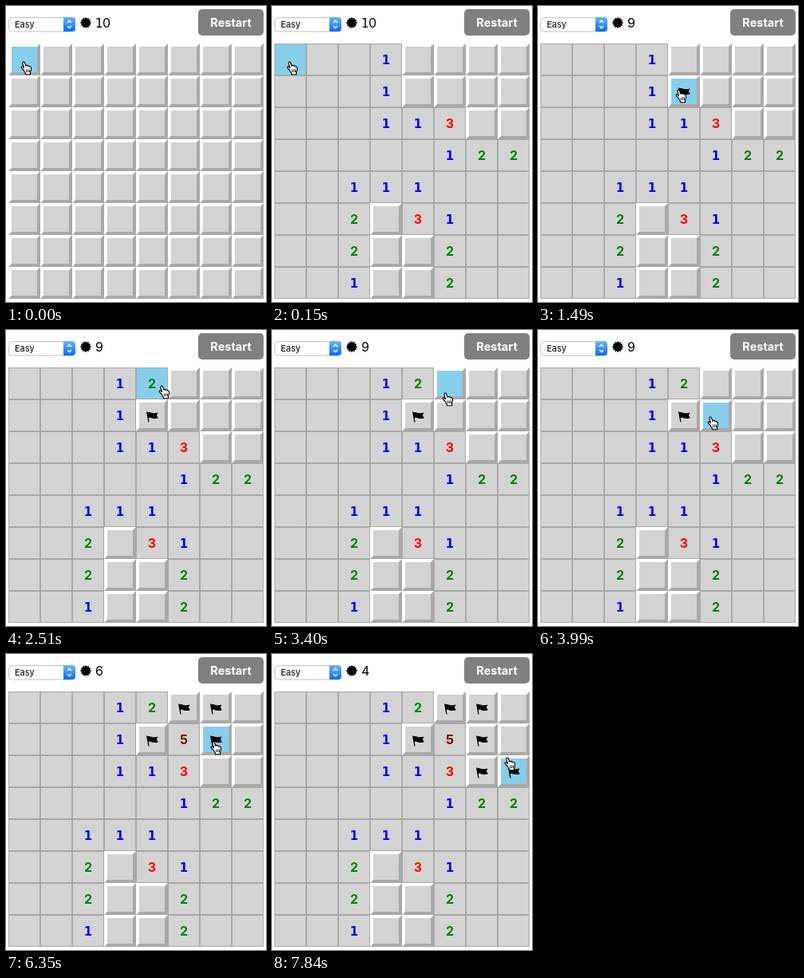
An HTML page that plays this animation: 326 px wide and 371 px high, repeating every 7990 ms.

```html
<!DOCTYPE html>
<html lang="en">
<head>
<meta charset="utf-8">
<title>Minesweeper</title>
<style>
  html, body { margin: 0; width: 100%; height: 100%; overflow: hidden; background: #fff; }
  svg { display: block; }
  text { font-family: Inter, "Open Sans", sans-serif; }
  .digit { font-size: 16px; font-weight: 700; text-anchor: middle; }
  .one { font-family: "DejaVu Sans", sans-serif; font-size: 15px; }
</style>
</head>
<body>
<svg width="326" height="371" viewBox="0 0 326 371">
  <defs>
    <linearGradient id="blue" x2="0" y2="1">
      <stop stop-color="#6cb3fa"/><stop offset="1" stop-color="#0a6cf5"/>
    </linearGradient>
    <clipPath id="selectClip"><rect x="3.5" y="14" width="83.5" height="18" rx="4"/></clipPath>
  </defs>
  <rect width="326" height="371" fill="#fff"/>

  <rect x="3.5" y="14.5" width="83" height="17.5" rx="4" fill="#fff" stroke="#c2c2c2"/>
  <rect x="72" y="14" width="15" height="18" fill="url(#blue)" clip-path="url(#selectClip)"/>
  <path d="M77 21l2.5-2.7 2.5 2.7M77 25l2.5 2.7 2.5-2.7" fill="none" stroke="#fff" stroke-width="1.4"/>
  <text x="11" y="27" font-size="11">Easy</text>

  <polygon id="mine"/>
  <text id="count" y="27" font-size="16"></text>

  <rect x="241" y="4" width="82" height="33" rx="5" fill="#808080"/>
  <text x="282" y="26" font-size="14.5" font-weight="700" fill="#fff" text-anchor="middle">Restart</text>

  <g id="board"></g>
  <g id="cursor" stroke="#000" stroke-linejoin="round" stroke-linecap="round">
    <path fill="#fff" stroke-width="1.1" d="M4.2 11.5L1.6 8.8C.6 7.5 1.4 6.5 2.8 7.1L4.5 8.6 3 3.2C2.4 1 4.6.2 5.4 2L6.9 6.2C7 5.2 9 5 9.3 6.4 9.6 5.7 11.2 5.7 11.4 7.1 12 6.6 13.4 6.9 13.5 8.2 13.9 10.2 13.7 12 12.6 14V16.8H6.4V15.2C5.6 14.2 5 12.9 4.2 11.5Z"/>
    <path stroke-width=".9" d="M7.6 10.8v3M9.6 10.8v3M11.5 10.8v3"/>
  </g>
</svg>
<script>
const LOOP = 7990, SIZE = 40, LEFT = 3, TOP = 47;
const COLORS = { 1: '#00f', 2: '#008000', 3: '#f00', 5: '#800000' };
const FLAG = 'M13 15.5L14.3 15.3 14.6 16.4C17.5 14.5 20 19 27.5 16.6L25.8 20 27.8 23.2C21 26 18.5 21.2 15.8 23.2L16.6 28.5H15.4Z';

// '#' is a covered cell, '.' an empty one
const OPENED = [
  '...1####', '...1####', '...113##', '.....122',
  '..111...', '..2#31..', '..2##2..', '..1##2..'
];

// [time, cursor x, cursor y, hovered cell as "column row"]
const POSES = [
  [0, 18, 69, '00'],
  [600, 36, 96, '01'], [750, 70, 142, '12'], [900, 98, 170, '22'],
  [1050, 112, 172, '23'], [1190, 150, 135, '32'], [1340, 172, 104, '41'],
  [1780, 174, 90, '41'], [1930, 176, 72, '40'], [2070, 178, 64, '40'],
  [2510, 191, 69, '40'], [2660, 206, 70, '50'], [2800, 212, 68, '50'],
  [3400, 213, 78, '50'], [3540, 213, 100, '51'], [3690, 213, 125, '51'],
  [3840, 212, 116, '51'], [3990, 212, 108, '51'],
  [4440, 213, 98, '51'], [4580, 214, 80, '50'], [4730, 215, 64, '50'],
  [5170, 228, 66, '50'], [5320, 246, 68, '60'], [5460, 255, 66, '60'],
  [5760, 256, 88, '61'], [5900, 256, 109, '61'],
  [6500, 256, 126, '61'], [6640, 256, 144, '62'],
  [7090, 292, 144, '72'], [7840, 291, 129, '72']
];
const FLAGS = { 41: 1490, 50: 4880, 60: 5610, 61: 6350, 62: 6790, 72: 7540 };
const REVEALS = { 40: [2370, '2'], 51: [4290, '5'] };
const FIRST_CLICK = 150;

const $ = id => document.getElementById(id);

$('mine').setAttribute('points', Array.from({ length: 24 }, (_, i) => {
  const r = i % 2 ? 5.4 : 7.2, a = i * Math.PI / 12;
  return `${100 + r * Math.sin(a)},${21 - r * Math.cos(a)}`;
}).join(' '));

function cellValue(col, row, t) {
  if (t < FIRST_CLICK) return '#';
  const reveal = REVEALS[`${col}${row}`];
  return reveal && t >= reveal[0] ? reveal[1] : OPENED[row][col];
}

function drawCell(col, row, t, hovered) {
  const key = `${col}${row}`, value = cellValue(col, row, t);
  const covered = value === '#', inset = covered ? 4 : 1;
  const inner = SIZE - 2 * inset;
  let out = `<g transform="translate(${LEFT + col * SIZE} ${TOP + row * SIZE})">
    <rect width="40" height="40" fill="#a9a9a9"/>`;
  if (covered) out += '<path d="M0 0H40L36 4H4V36L0 40Z" fill="#fff"/>';
  out += `<rect x="${inset}" y="${inset}" width="${inner}" height="${inner}" fill="${hovered === key ? '#87ceeb' : '#d3d3d3'}"/>`;
  if (covered && t >= FLAGS[key]) out += `<path d="${FLAG}"/>`;
  if (COLORS[value]) {
    out += `<text class="digit${value === '1' ? ' one' : ''}" x="20" y="26" fill="${COLORS[value]}">${value}</text>`;
  }
  return out + '</g>';
}

function drawCount(n) {
  $('count').innerHTML = n === 10
    ? '<tspan x="112" class="one">1</tspan><tspan x="121">0</tspan>'
    : `<tspan x="112">${n}</tspan>`;
}

const moments = [...new Set([
  FIRST_CLICK, ...POSES.map(p => p[0]), ...Object.values(FLAGS),
  ...Object.values(REVEALS).map(r => r[0])
])].sort((a, b) => a - b);
let shown = -1;

function render(time) {
  const t = moments.findLast(m => m <= time);
  if (t === shown) return;
  shown = t;
  const [, x, y, hovered] = POSES.findLast(p => p[0] <= t);
  let cells = '';
  for (let row = 0; row < 8; row++)
    for (let col = 0; col < 8; col++) cells += drawCell(col, row, t, hovered);
  $('board').innerHTML = cells;
  $('cursor').setAttribute('transform', `translate(${x} ${y})`);
  drawCount(10 - Object.values(FLAGS).filter(at => at <= t).length);
}

const start = performance.now();
function tick() {
  render((performance.now() - start) % LOOP);
  requestAnimationFrame(tick);
}
tick();
</script>
</body>
</html>
```
